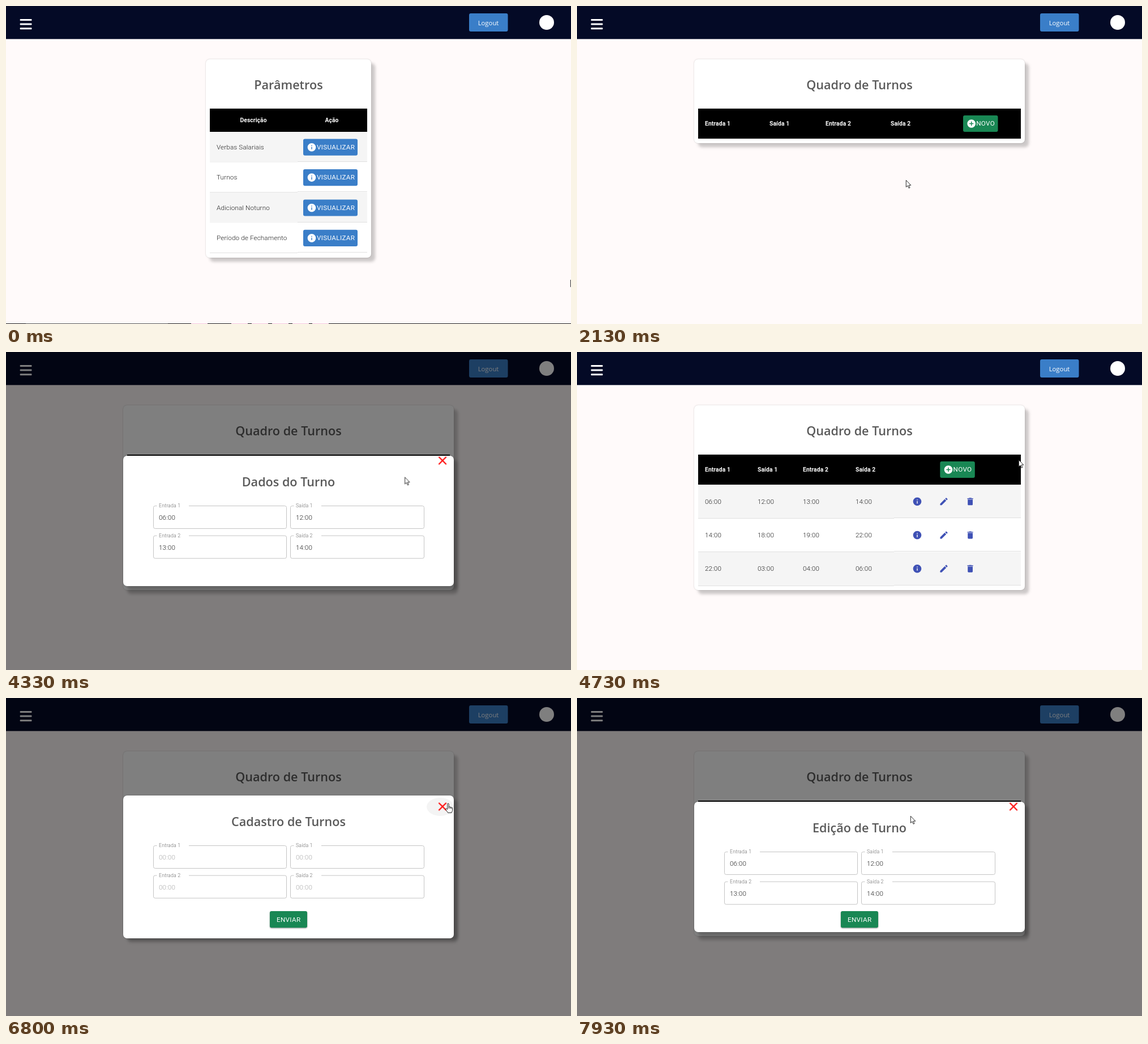
Recreate the animation shown at these times as an HTML page. Size 998 by 561 pixels, loop 8 s.

```html
<!DOCTYPE html>
<html lang="pt-BR">
<head>
<meta charset="utf-8">
<title>Quadro de Turnos</title>
<style>
html, body { margin: 0; width: 100%; height: 100%; overflow: hidden; background: #fffafa; }
svg { display: block; width: 100%; height: 100%; }
text { font: 300 11.69px Roboto, sans-serif; letter-spacing: .01071em; fill: #222; }
.title { font: 600 21.6px "Open Sans", sans-serif; letter-spacing: 0; fill: #5a5a5a; text-anchor: middle; }
.head { font-weight: 700; font-size: 10.3px; fill: #fff; }
.mid { text-anchor: middle; }
.button { font-weight: 400; letter-spacing: .02857em; fill: #fff; }
.logout { font: 400 11.3px "Open Sans", sans-serif; letter-spacing: 0; fill: #fff; text-anchor: middle; }
.label { font-size: 8.77px; letter-spacing: .02em; fill: #666; }
.empty { fill: #aaa; }
.card { fill: #fff; filter: drop-shadow(0 0 1px rgba(0,0,0,.2)) drop-shadow(7px 7px 2.5px rgba(0,0,0,.2)); }
.send { filter: drop-shadow(0 1px 1px rgba(0,0,0,.4)); }
.line { fill: none; stroke: #e0e0e0; }
.field { fill: none; stroke: #c4c4c4; }
.dim { opacity: 0; animation: dim 8s linear infinite; }
.pointer { animation: travel 8s ease-in-out infinite; }
@keyframes dim {
  0%, 50% { opacity: 0 }
  52.1%, 59.12% { opacity: .5 }
  59.125%, 68.4% { opacity: 0 }
  70.8%, 86.62% { opacity: .5 }
  86.625%, 96.25% { opacity: 0 }
  98.9%, 100% { opacity: .5 }
}
@keyframes travel {
  0%, 2.4% { transform: translate(997px, 483px) }
  5.9%, 10.8% { transform: translate(680px, 368px) }
  20.9%, 21.5% { transform: translate(600px, 293px) }
  22.5%, 33.2% { transform: translate(581px, 307px) }
  43.4%, 44% { transform: translate(598px, 283px) }
  46.6%, 50% { transform: translate(596px, 264px) }
  57.5%, 59.2% { transform: translate(780px, 190px) }
  65%, 68.8% { transform: translate(660px, 206px) }
  70.8%, 71.2% { transform: translate(634px, 206px) }
  78.4%, 79% { transform: translate(560px, 290px) }
  84.8%, 86.7% { transform: translate(781px, 187px) }
  89.1%, 89.9% { transform: translate(645px, 279px) }
  93.4%, 95.9% { transform: translate(644px, 263px) }
  99%, 100% { transform: translate(589px, 208px) }
}
</style>
</head>
<body>
<svg id="stage" viewBox="0 0 998 561" preserveAspectRatio="none"></svg>
<script>
const LOOP = 8000;
const BLUE = '#3a7ec8', GREEN = '#198754', INDIGO = '#3f51b5';
const DISC = 'M12 2C6.48 2 2 6.48 2 12s4.48 10 10 10 10-4.48 10-10S17.52 2 12 2z';
const ICONS = {
  info: DISC + 'm1 15h-2v-6h2v6zm0-8h-2V7h2v2z',
  add: DISC + 'm5 11h-4v4h-2v-4H7v-2h4V7h2v4h4v2z',
  edit: 'M3 17.25V21h3.75L17.81 9.94l-3.75-3.75zM20.71 7.04a1 1 0 000-1.41l-2.34-2.34a1 1 0 00-1.41 0l-1.83 1.83 3.75 3.75z',
  trash: 'M6 19c0 1.1.9 2 2 2h8c1.1 0 2-.9 2-2V7H6v12zM19 4h-3.5l-1-1h-5l-1 1H5v2h14V4z',
  close: 'M19 6.41L17.59 5 12 10.59 6.41 5 5 6.41 10.59 12 5 17.59 6.41 19 12 13.41 17.59 19 19 17.59 13.41 12z'
};

const rect = (x, y, w, h, fill, r = 0, cls = '') =>
  `<rect x="${x}" y="${y}" width="${w}" height="${h}" rx="${r}" ${fill ? `fill="${fill}"` : ''} class="${cls}"/>`;
const text = (x, y, s, cls = '') => `<text x="${x}" y="${y}" class="${cls}">${s}</text>`;
const icon = (name, x, y, fill, k = .73) =>
  `<path d="${ICONS[name]}" fill="${fill}" transform="translate(${x} ${y}) scale(${k}) translate(-12 -12)"/>`;
const path = (d, cls) => `<path d="${d}" class="${cls}"/>`;
const card = (x, y, w, h) => rect(x, y, w, h, '', 7, 'card');
const hover = (x, y, rx, ry, fill) => `<ellipse cx="${x}" cy="${y}" rx="${rx}" ry="${ry}" fill="${fill}"/>`;

// Shows the content during the given [from, to] spans of the loop, with hard switches.
let rules = '', count = 0;
function during(spans, content) {
  const name = 'show' + count++;
  const pct = ms => ms / LOOP * 100 + '%';
  const steps = spans.map(([a, b]) => `${pct(a)}{opacity:1}${pct(b)}{opacity:0}`).join('');
  rules += `@keyframes ${name}{0%{opacity:0}${steps}}.${name}{opacity:0;animation:${name} ${LOOP}ms step-end infinite}`;
  return `<g class="${name}">${content}</g>`;
}

const border = (x1, split, x2, y) =>
  path(`M${x1} ${y - .5}H${split}M${split} ${y - 1.5}H${x2}`, 'line');

function header() {
  const bars = [23, 30.6, 38.2].map(y => rect(24.7, y, 20.8, 3, '#fff', .8)).join('');
  return rect(0, 0, 998, 58.3, '#040a26') + bars +
    rect(818, 13, 68.5, 32, BLUE, 3) + text(852, 33.6, 'Logout', 'logout') +
    '<circle cx="955" cy="29" r="13" fill="#fff"/>';
}

function taskbar() {
  const tabs = [327, 398, 434, 470, 506, 541].map(x => rect(x, 560, 29, 1, '#f5c6dc')).join('');
  return rect(0, 560, 998, 1, '#1c1c1c') + rect(35, 560, 251, 1, '#555') + tabs;
}

function parameters() {
  const names = ['Verbas Salariais', 'Turnos', 'Adicional Noturno', 'Período de Fechamento'];
  const rows = names.map((name, i) => {
    const y = 222 + i * 53.4;
    return rect(360, y, 278, 53.4, i % 2 ? '#fff' : '#f5f5f5') +
      border(360, 515, 638, Math.round(y + 54)) + text(372, y + 31, name) +
      rect(525, y + 12.6, 96, 29.2, BLUE, 3) + icon('info', 540, y + 27.2, '#fff') +
      text(549, y + 31, 'VISUALIZAR', 'button');
  }).join('');
  return card(353, 94, 292, 350) + text(499, 147, 'Parâmetros', 'title') +
    rect(360, 181, 278, 41, '#000') + text(437, 205, 'Descrição', 'head mid') +
    text(575.5, 205, 'Ação', 'head mid') + rows;
}

function board(bottom, columns, buttonX, rows = '') {
  const heads = ['Entrada 1', 'Saída 1', 'Entrada 2', 'Saída 2'];
  return card(207, 94, 584, bottom - 94) + text(499, 147, 'Quadro de Turnos', 'title') +
    rect(214, 181, 570, 53, '#000') +
    heads.map((s, i) => text(columns[i], 210.7, s, 'head')).join('') +
    rect(buttonX, 193, 61.5, 29, GREEN, 3) + icon('add', buttonX + 14.7, 207.5, '#fff') +
    text(buttonX + 23.2, 211.3, 'NOVO', 'button') + rows;
}

const SHIFTS = ['06:00 12:00 13:00 14:00', '14:00 18:00 19:00 22:00', '22:00 03:00 04:00 06:00']
  .map(s => s.split(' '));
const FILLED = [226, 319, 399, 492];

function shiftRows() {
  const backs = SHIFTS.map((_, i) =>
    rect(214, 234 + i * 59.3, 570, 59.3, i % 2 ? '#fff' : '#f5f5f5')).join('');
  const hovers = during([[3530, 4000]], hover(595.3, 264, 23, 17.5, '#ebeff1')) +
    during([[7270, 7730]], hover(643, 264, 21, 16, '#ebeff1'));
  const cells = SHIFTS.map((shift, i) => {
    const y = 263.8 + i * 59.2;
    return border(214, 560, 784, Math.round(294 + i * 59.3)) +
      shift.map((s, j) => text(FILLED[j], y + 4.2, s)).join('') +
      icon('info', 601, y, INDIGO) + icon('edit', 648, y, INDIGO) + icon('trash', 694.6, y, INDIGO);
  }).join('');
  return backs + hovers + cells;
}

function dialog(title, top, bottom, values, send) {
  const fields = ['Entrada 1', 'Saída 1', 'Entrada 2', 'Saída 2'].map((label, i) => {
    const [x, right, gap] = i % 2 ? [502.5, 738.5, 557] : [260.5, 495.5, 323];
    const y = top + 88.5 + (i > 1 ? 52.6 : 0), end = y + 40;
    const outline = `M${x + 6} ${y}H${x + 3}q-3 0-3 3V${end - 3}q0 3 3 3H${right - 3}q3 0 3-3V${y + 3}q0-3-3-3H${gap}`;
    return path(outline, 'field') + text(x + 9.5, y + 2.6, label, 'label') +
      text(x + 9.5, y + 24.7, values ? values[i] : '00:00', values ? '' : 'empty');
  }).join('');
  const button = rect(466, 376, 66, 29.3, GREEN, 3, 'send') + text(499.2, 394.8, 'ENVIAR', 'button mid');
  return card(207, top, 584, bottom - top) +
    text(499, top + 54, title, 'title') + fields + (send ? button : '') +
    during([[4530, 4730], [6730, 6930]], hover(767, 192, 24, 16, '#f4f4f4')) +
    icon('close', 771, 191.6, '#f00', 1.05);
}

const arrow = '<path d="M.3.4v12l2.8-2.5 2 4.4 1.9-.8-2-4.3h3.8z" fill="#fff" stroke="#111" stroke-width=".9"/>';
const hand = '<path d="M-1.2 8V.4q0-1.4 1.2-1.4t1.2 1.4V5q2-1 2.4.6 1.9-.7 2.2.7 1.8-.4 1.8 1.3v4L6 15.5H-.4L-4 10q-.9-2 .6-2.2.9 0 2.2 1.8zM1.2 5v3M3.6 5.6v2.6M5.8 6.3v2.2" fill="#fff" stroke="#111" stroke-width=".9"/>';
const onButtons = [[1530, 2000], [3530, 3870], [4470, 4730], [5130, 5530], [6670, 6930], [7200, 7670]];
const offButtons = [...onButtons, [LOOP]].map(([a], i) => [i ? onButtons[i - 1][1] : 0, a]);

document.getElementById('stage').innerHTML =
  rect(0, 0, 998, 561, '#fffafa') + header() +
  during([[0, 2000]], parameters()) +
  during([[2000, 2670]], board(242, [226, 340, 439, 554], 682)) +
  during([[2670, LOOP]], board(420, FILLED, 641.3, shiftRows())) +
  rect(0, 0, 998, 561, '#000', 0, 'dim') +
  during([[4000, 4730]], dialog('Dados do Turno', 183, 413, SHIFTS[0], false)) +
  during([[5500, 6930]], dialog('Cadastro de Turnos', 172, 424, null, true)) +
  during([[7730, LOOP]], dialog('Edição de Turno', 183, 413, SHIFTS[0], true)) +
  during([[0, 1000]], taskbar()) +
  `<g class="pointer">${during(offButtons, arrow)}${during(onButtons, hand)}</g>`;
document.head.appendChild(document.createElement('style')).textContent = rules;
</script>
</body>
</html>
```
